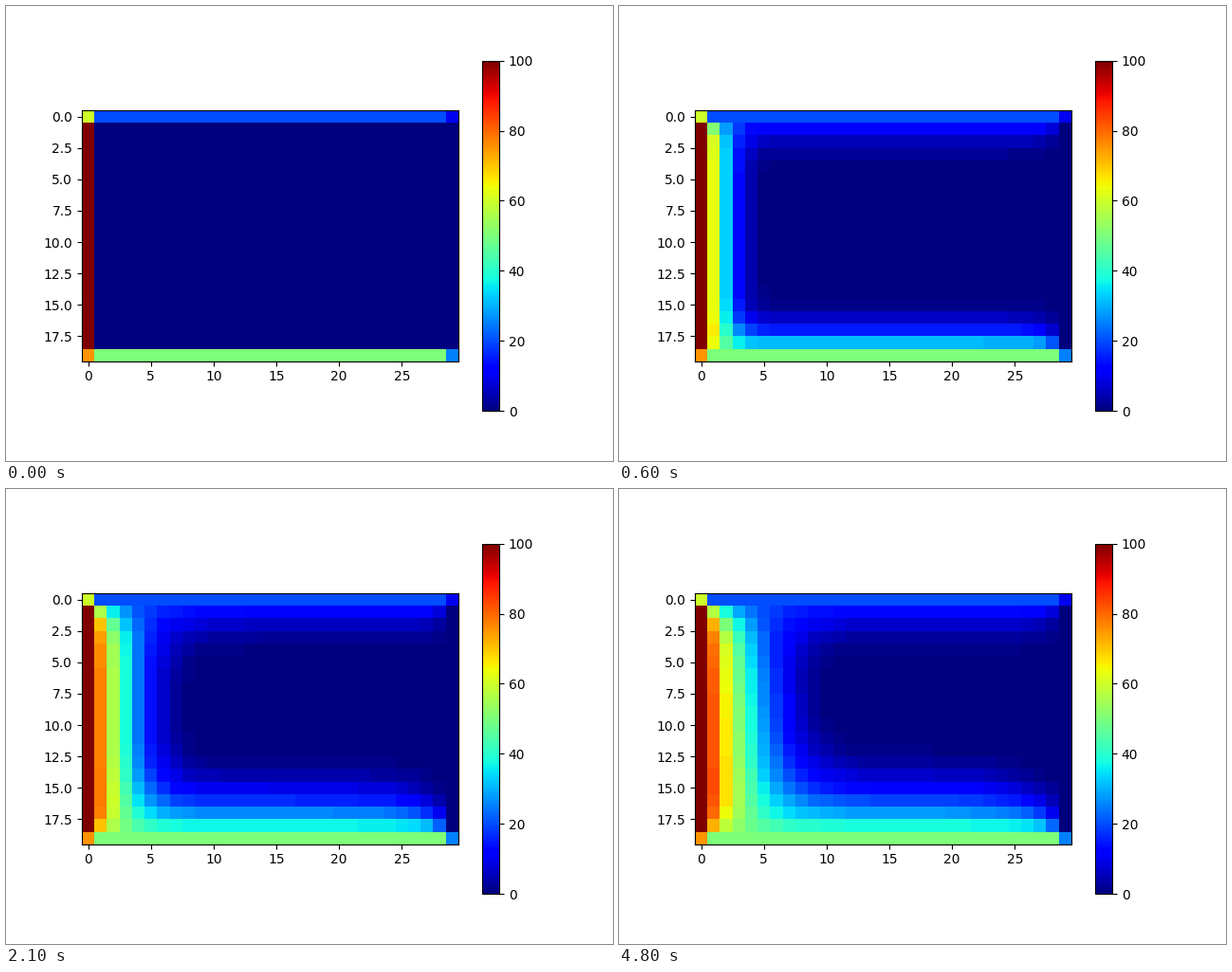
A matplotlib script that plays this animation: 640 by 480 pixels, repeating every 5000 ms.

```python
import numpy as np
import matplotlib.pyplot as plt
from matplotlib.animation import FuncAnimation

ROWS, COLS = 20, 30
FRAMES, INTERVAL = 50, 100
LEFT, RIGHT, TOP, BOTTOM = 100, 0, 20, 50


def make_plate():
    """Cold plate with fixed edge temperatures and averaged corners."""
    plate = np.zeros((ROWS, COLS), dtype=int)
    plate[:, 0], plate[:, -1] = LEFT, RIGHT
    plate[0, 1:-1], plate[-1, 1:-1] = TOP, BOTTOM
    plate[0, 0], plate[0, -1] = (LEFT + TOP) // 2, (RIGHT + TOP) // 2
    plate[-1, 0], plate[-1, -1] = (LEFT + BOTTOM) // 2, (RIGHT + BOTTOM) // 2
    return plate


def diffuse(plate):
    """Replace each inner cell by the whole-number mean of its 3x3 block."""
    total = sum(
        plate[r:ROWS - 2 + r, c:COLS - 2 + c]
        for r in range(3) for c in range(3)
    )
    result = plate.copy()
    result[1:-1, 1:-1] = total // 9
    return result


states = [make_plate()]
while len(states) < FRAMES:
    states.append(diffuse(states[-1]))

fig, ax = plt.subplots(figsize=(6.4, 4.8), dpi=100)
image = ax.imshow(states[0], cmap="jet", vmin=0, vmax=100,
                  interpolation="nearest")
fig.colorbar(image)


def update(i):
    image.set_data(states[i])
    return [image]


anim = FuncAnimation(fig, update, frames=FRAMES, interval=INTERVAL,
                     repeat=True, repeat_delay=0, blit=False)
plt.show()
```
